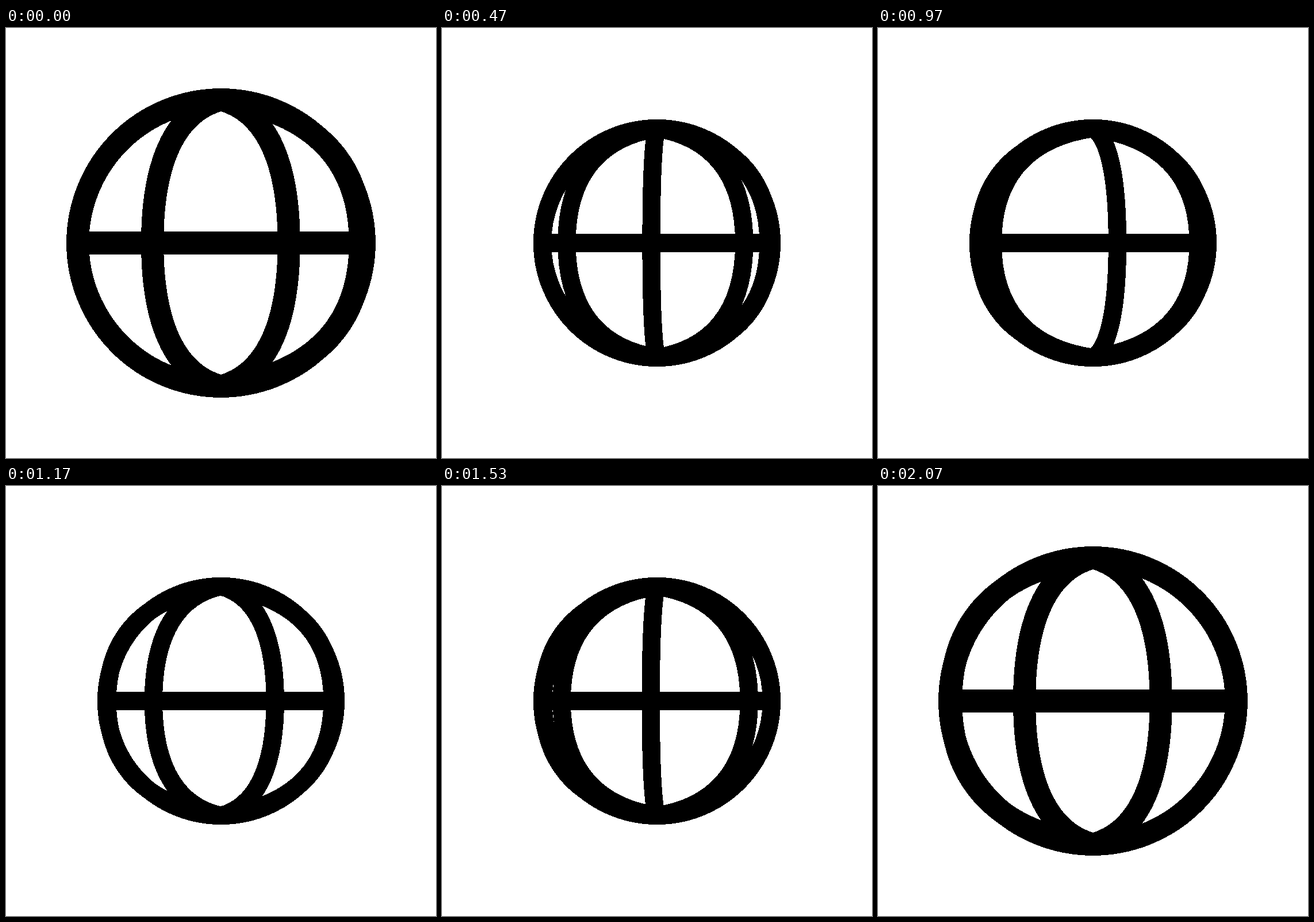
An HTML page that plays this animation: 748x748 px, repeating every 2.13 s.

```html
<!DOCTYPE html>
<html lang="en">
<head>
<meta charset="utf-8">
<title>Spinning globe</title>
<style>
  html, body { margin: 0; width: 100%; height: 100%; overflow: hidden; background: #fff; }
  svg { display: block; width: 100vw; height: 100vh; }
</style>
</head>
<body>
<svg viewBox="0 0 748 748" shape-rendering="crispEdges">
  <g id="globe" fill="none" stroke="#000" stroke-width="39.2">
    <circle r="249.3"/>
    <path d="M-249.3 0H249.3"/>
    <path id="meridians"/>
  </g>
</svg>
<script>
const LOOP = 2130, FPS = 30, LAST = 62;
const R = 249.3, LEFT = -0.992;
const globe = document.getElementById('globe');
const meridians = document.getElementById('meridians');

// Each line crosses the equator at a fraction of R, moving between two frames.
const lines = [
  { from: -0.479, to: LEFT, start: 3.8, end: 22.3 },
  { from: 0.474, to: LEFT, start: 3.8, end: 27.7 },
  { from: 0.972, to: LEFT, start: 7.2, end: 34.2 },
  { from: 0.985, to: LEFT, start: 17, end: 44 },
  { from: 0.985, to: LEFT, start: 25, end: 52 },
  { from: 0.972, to: -0.479, start: 35.4, end: 52.8 },
  { from: 0.982, to: 0.474, start: 41, end: 52.8 }
];

// cubic-bezier(.5, 0, .5, 1), solved by bisection
function ease(u) {
  if (u <= 0) return 0;
  if (u >= 1) return 1;
  let low = 0, high = 1;
  for (let i = 0; i < 24; i++) {
    const s = (low + high) / 2;
    if (1.5 * s * (1 - s) + s ** 3 < u) low = s; else high = s;
  }
  return low * low * (3 - 2 * low);
}

const tween = (frame, { from, to, start, end }) =>
  from + (to - from) * ease((frame - start) / (end - start));

// Half an oval, slightly pointed at the poles.
function meridian(x) {
  const poleX = 0.6 * x, poleY = 0.925, side = 0.62;
  const points = [
    [0, -1],
    [poleX, -poleY], [x, -side], [x, 0],
    [x, side], [poleX, poleY], [0, 1]
  ].map(p => p.map(v => (v * R).toFixed(2)).join(' '));
  return `M${points[0]}C${points.slice(1).join(' ')}`;
}

function draw(time) {
  const frame = Math.min(LAST, Math.floor((time % LOOP + 3.4) * FPS / 1000));
  const scale = 1 - 0.2 * (ease(frame / 10) - ease((frame - 52) / 10));
  globe.setAttribute('transform', `translate(374 374) scale(${scale})`);
  meridians.setAttribute('d', lines.map(line => meridian(tween(frame, line))).join(''));
}

const begin = performance.now();
function tick() {
  draw(performance.now() - begin);
  requestAnimationFrame(tick);
}
tick();
</script>
</body>
</html>
```
